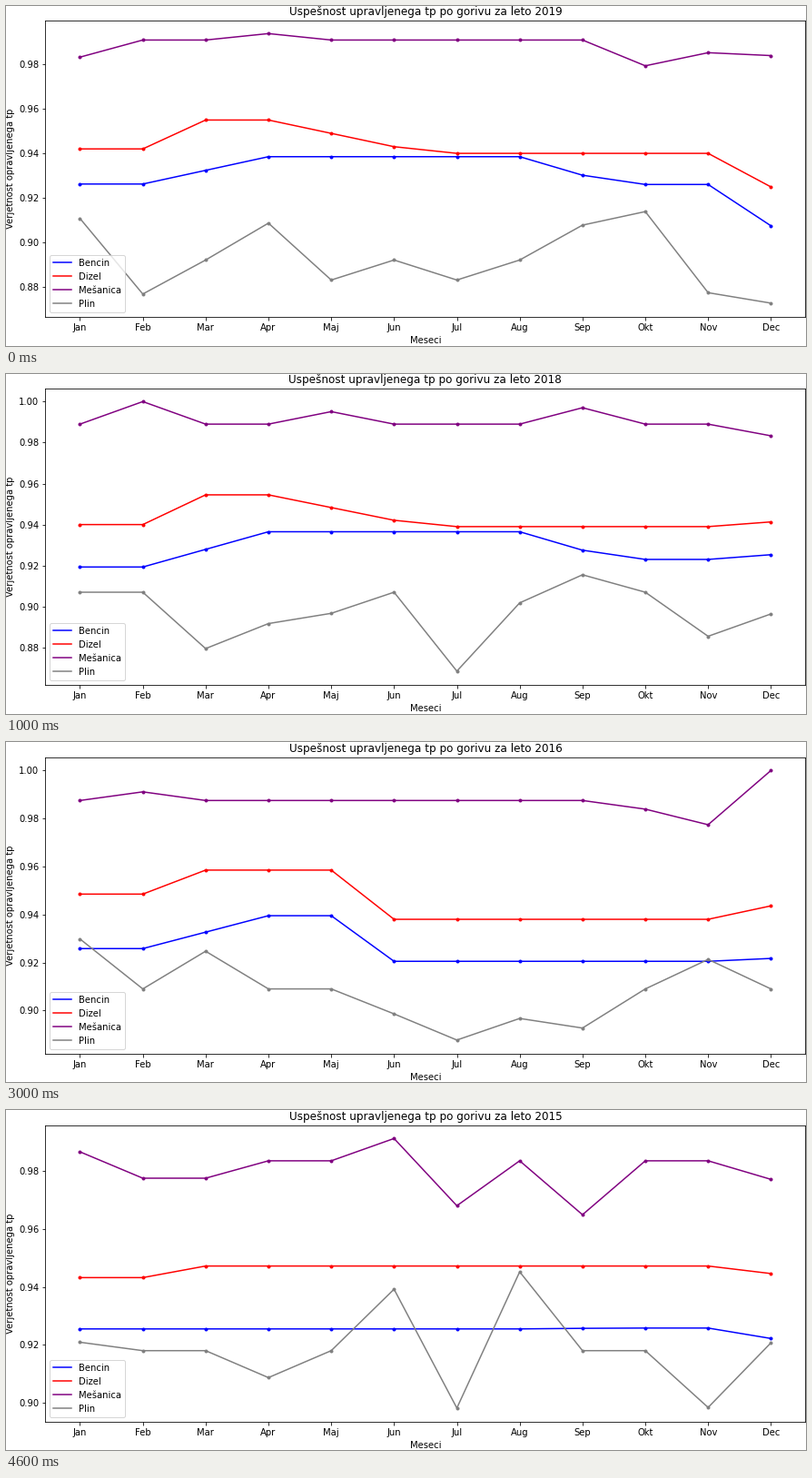
These frames come from a looping animation (881x374 px, 5 s). A matplotlib script:

```python
import matplotlib.pyplot as plt
import numpy as np
from matplotlib.animation import FuncAnimation

W, H, DPI = 881, 374, 72
LEFT, AX_W, AX_H = 43.43, 837, 326.16

MONTHS = "Jan Feb Mar Apr Maj Jun Jul Aug Sep Okt Nov Dec".split()
FUELS = [("Bencin", "blue"), ("Dizel", "red"),
         ("Mešanica", "purple"), ("Plin", "gray")]


# Rates are in per mille.
def season(start, peak, rest, end, top, until, fall):
    """Spring rise to a plateau, a fall to the resting level, a last step."""
    knots = [1, top, until, until + fall, 10, 11]
    return np.interp(range(12), knots, [start, peak, peak, rest, rest, end])


def petrol(*levels, until=7, fall=1.5):
    return season(*levels, top=3, until=until, fall=fall)


def diesel(*levels, until=3, fall=2.5):
    return season(*levels, top=2, until=until, fall=fall)


def steady(level, **odd):
    """A constant level apart from the odd months."""
    return np.array([odd.get(month, level) for month in MONTHS])


def year_2019():
    return (petrol(926.2, 938.5, 926, 907.4),
            diesel(942, 955, 940, 924.9),
            steady(991, Jan=983.3, Apr=993.9, Okt=979.4, Nov=985.3, Dec=984),
            steady(892, Jan=910.7, Feb=876.7, Apr=908.6, Maj=883, Jul=883,
                   Sep=907.7, Okt=913.8, Nov=877.3, Dec=872.6))


def year_2018():
    return (petrol(919.3, 936.5, 923, 925.3),
            diesel(940, 954.5, 939, 941.3),
            steady(989, Feb=1000, Maj=995.1, Sep=997, Dec=983.3),
            steady(907, Mar=879.5, Apr=891.7, Maj=896.7, Jul=868.5,
                   Aug=901.8, Sep=915.5, Nov=885.5, Dec=896.4))


def year_2017():
    return (petrol(914.5, 930, 921, 921.6),
            diesel(939.6, 954, 939, 941.4),
            steady(985, Jan=972.5, Feb=973.9, Apr=988.2, Sep=988,
                   Okt=979.4, Nov=975.8),
            steady(908.5, Apr=877.6, Maj=894.3, Jul=897.5, Aug=886.6,
                   Okt=902.6, Nov=883.3, Dec=893.9))


def year_2016():
    return (petrol(925.8, 939.5, 920.5, 921.7, until=4, fall=1),
            diesel(948.5, 958.5, 938, 943.6, until=4, fall=1),
            steady(987.5, Feb=991.1, Okt=983.9, Nov=977.4, Dec=1000),
            steady(909, Jan=929.8, Mar=924.7, Jun=898.6, Jul=887.7,
                   Aug=896.7, Sep=892.7, Nov=921.3))


def year_2015():
    return (petrol(925.5, 925.5, 925.8, 922.2),
            diesel(943.2, 947.2, 947.2, 944.6),
            steady(983.5, Jan=986.6, Feb=977.5, Mar=977.5, Jun=991.2,
                   Jul=968, Sep=964.9, Dec=977.1),
            steady(918, Jan=920.9, Apr=908.7, Jun=939.2, Jul=898.2,
                   Aug=945.2, Nov=898.4, Dec=920.7))


# (year, rates by fuel, bottom edge of the axes in pixels)
PAGES = [(2019, year_2019(), 32.33), (2018, year_2018(), 32.33),
         (2017, year_2017(), 30.33), (2016, year_2016(), 31.33),
         (2015, year_2015(), 31.33)]

plt.rcParams["font.family"] = "DejaVu Sans"
fig = plt.figure(figsize=(W / DPI, H / DPI), dpi=DPI, facecolor="white")
ax = fig.add_axes([0, 0, 1, 1])


def draw(i):
    year, rates, bottom = PAGES[i]
    ax.clear()
    ax.set_position([LEFT / W, bottom / H, AX_W / W, AX_H / H])
    for (name, color), row in zip(FUELS, rates):
        ax.plot(MONTHS, row / 1000, color=color, label=name)
        ax.plot(MONTHS, row / 1000, ".", color=color)
    ax.set_title(f"Uspešnost upravljenega tp po gorivu za leto {year}")
    ax.set_xlabel("Meseci")
    ax.set_ylabel("Verjetnost opravljenega tp")
    ax.legend(loc="lower left")


anim = FuncAnimation(fig, draw, frames=len(PAGES), init_func=lambda: None,
                     interval=1000, repeat=True, repeat_delay=0)
plt.show()
```
